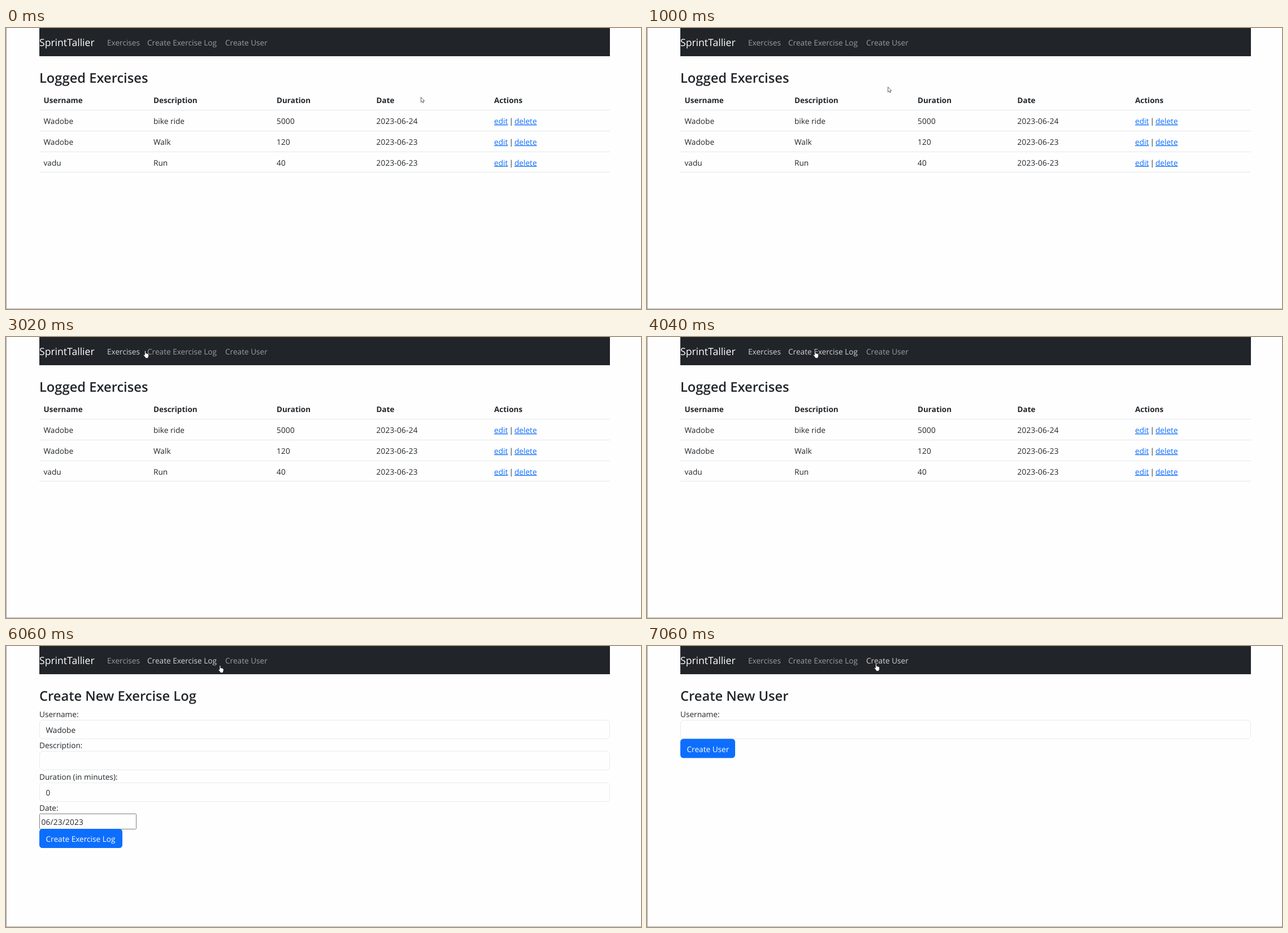
Write an HTML page that moves like this. It is 1124 px wide and 498 px high and loops after 8 s.

```html
<!DOCTYPE html>
<html lang="en">
<head>
<meta charset="utf-8">
<title>Exercise log</title>
<style>
  html, body { margin: 0; width: 100%; height: 100%; overflow: hidden; background: #fefefe; }
  svg { display: block; width: 1124px; height: 498px; }
  text { font: 13.65px "Open Sans", "Noto Sans", sans-serif; fill: #212529; white-space: pre; text-rendering: geometricPrecision; }
  .brand { font-size: 17.6px; fill: #fff; }
  .nav { fill: #9b9d9f; }
  .nav.lit { fill: #d3d4d5; }
  .title { font-size: 23.7px; font-weight: 600; }
  .head { font-size: 13.5px; font-weight: 700; }
  .num { letter-spacing: .2px; }
  .link { fill: #0d6efd; text-decoration: underline; }
  .onblue { fill: #fff; }
  .field { fill: #fefefe; stroke: #e8eaed; }
  .date { fill: #fefefe; stroke: #808080; }
  .button { fill: #0d6efd; }
  .rule { fill: #e4e7ea; }
  .cursor { stroke-linejoin: round; }
</style>
</head>
<body>
<svg id="stage" viewBox="0 0 1124 498"></svg>
<script>
const stage = document.getElementById("stage");

function add(parent, tag, attrs, content) {
  const el = document.createElementNS("http://www.w3.org/2000/svg", tag);
  for (const key in attrs) el.setAttribute(key, attrs[key]);
  if (content) el.textContent = content;
  parent.append(el);
  return el;
}
const group = () => add(stage, "g", {});
const text = (g, x, y, content, style = "") => add(g, "text", { x, y, class: style }, content);
const box = (g, x, y, width, height, style, rx = 0) =>
  add(g, "rect", { x, y, width, height, rx, class: style });

function field(g, y, value) {
  box(g, 59.5, y + .5, 1009, 33, "field", 5.5);
  if (value) text(g, 70.5, y + 23, value);
}
function button(g, y, width, caption) {
  box(g, 59, y, width, 34, "button", 5.5);
  text(g, 70.5, y + 23, caption, "onblue");
}

// Page frame and navigation bar
const frame = group();
add(frame, "rect", { x: 0, y: 0, width: 1, height: 498, fill: "#9b9b9b" });
add(frame, "rect", { x: 0, y: 497, width: 1124, height: 1, fill: "#adadad" });
add(frame, "rect", { x: 59, y: 0, width: 1010, height: 50, fill: "#212529" });
text(frame, 59, 32, "SprintTallier", "brand");
const links = [[179, "Exercises"], [250, "Create Exercise Log"], [388, "Create User"]]
  .map(([x, label]) => text(frame, x, 31, label, "nav"));

// Exercise table
const list = group();
const columns = [66.5, 261, 479, 655.5, 864];
text(list, 59, 97, "Logged Exercises", "title");
["Username", "Description", "Duration", "Date", "Actions"]
  .forEach((name, i) => text(list, columns[i], 133, name, "head"));
[
  ["Wadobe", "bike ride", "5000", "2023-06-24"],
  ["Wadobe", "Walk", "120", "2023-06-23"],
  ["vadu", "Run", "40", "2023-06-23"]
].forEach((row, r) => {
  const y = 170 + r * 36.8;
  row.forEach((cell, i) => text(list, columns[i], y, cell, i > 1 ? "num" : ""));
  text(list, 864, y, "edit", "link");
  text(list, 890.5, y, "|");
  text(list, 900, y, "delete", "link");
});
for (let i = 0; i < 4; i++) box(list, 59, Math.round(145 + i * 36.8), 1010, 1, "rule");

// New exercise form
const logForm = group();
text(logForm, 59, 97, "Create New Exercise Log", "title");
["Username:", "Description:", "Duration (in minutes):", "Date:"]
  .forEach((name, i) => text(logForm, 59, 126 + i * 55.4, name));
field(logForm, 131, "Wadobe");
field(logForm, 186);
field(logForm, 242, "0");
box(logForm, 59.5, 297.5, 171, 27, "date", 1);
text(logForm, 62.5, 317, "06/23/2023", "num");
button(logForm, 324, 147, "Create Exercise Log");

// New user form
const userForm = group();
text(userForm, 59, 97, "Create New User", "title");
text(userForm, 59, 126, "Username:");
field(userForm, 131);
button(userForm, 164.5, 97, "Create User");

const arrow = add(stage, "path", {
  class: "cursor", fill: "#fff", stroke: "#555", "stroke-width": .9,
  d: "M.5.6V9.6L2.6 7.8L4 10.7L5.3 10.1L4 7.2H6.8Z"
});
const hand = add(stage, "path", {
  class: "cursor", fill: "#fff", stroke: "#16191c", "stroke-width": .8,
  d: "M2.5 8V1.6Q2.6.6 3.5.6T4.5 1.6V4.9Q5.6 4.4 6.2 5.2Q7.2 4.8 7.8 5.7" +
     "Q9.6 5.5 9.6 7.2V9.6Q9.5 11.2 8.6 12V13.4H3.6V12.2L.6 8.6Q.2 7.4 1.3 7.2Z"
});

const pages = [list, logForm, userForm];
// start, page, cursor, x, y, highlighted links
const steps = [
  [0, list, arrow, 734, 122, []],
  [1000, list, arrow, 426, 104, []],
  [2020, list, hand, 205, 24, [0]],
  [3020, list, hand, 243, 24, [0]],
  [4040, list, hand, 294, 24, [0, 1]],
  [5040, list, hand, 294, 24, [1]],
  [6060, logForm, hand, 375.5, 34, [1]],
  [7060, userForm, hand, 402, 31, [2]]
];
const show = (el, on) => el.setAttribute("visibility", on ? "visible" : "hidden");
let current;

function draw(time) {
  const step = steps.findLast(s => s[0] <= time);
  if (step === current) return;
  current = step;
  const [, page, cursor, x, y, lit] = step;
  pages.forEach(p => show(p, p === page));
  [arrow, hand].forEach(c => show(c, c === cursor));
  cursor.setAttribute("transform", `translate(${x} ${y})`);
  links.forEach((link, i) => link.classList.toggle("lit", lit.includes(i)));
}

const begin = performance.now();
function tick() {
  draw((performance.now() - begin) % 8000);
  requestAnimationFrame(tick);
}
tick();
</script>
</body>
</html>
```
